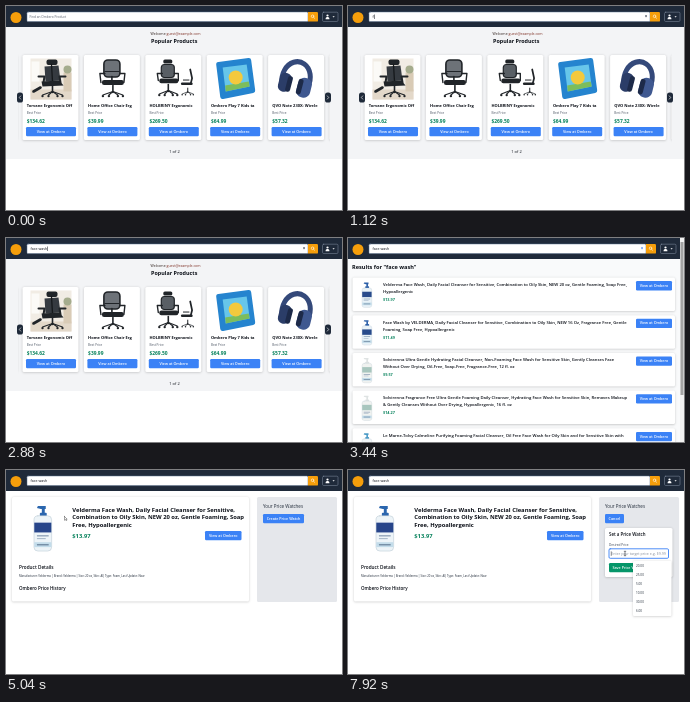
An HTML page with a canvas for the animation above (8 s loop, 336x204 px).

```html
<!DOCTYPE html>
<html lang="en">
<head>
<meta charset="utf-8">
<title>Price watch demo</title>
<style>
html, body { margin: 0; width: 100%; height: 100%; overflow: hidden; background: #fff; }
canvas { display: block; width: 336px; height: 204px; }
</style>
</head>
<body>
<canvas id="stage"></canvas>
<script>
const W = 336, H = 204, LOOP = 8000;
const canvas = document.getElementById('stage');
const ctx = canvas.getContext('2d');
const ratio = window.devicePixelRatio || 1;
canvas.width = W * ratio;
canvas.height = H * ratio;

const FONT = '"Open Sans", "Noto Sans", sans-serif';
const NAVY = '#1f2a3a', BLUE = '#3b82f6', GREEN = '#059669', INK = '#0b0f17', ORANGE = '#f59e0b';
const PRICE = '#04805a';
const SHOP = 'Ombero';
const QUERY = 'face wash';

// Moments of the story, in ms
const T = { type: 1040, key: 180, results: 3040, product: 4640, form: 5760, focus: 6800 };

function rect(x, y, w, h, fill, r = 0, stroke, line = 0.5) {
  ctx.beginPath();
  ctx.roundRect(x, y, w, h, r);
  if (fill) { ctx.fillStyle = fill; ctx.fill(); }
  if (stroke) { ctx.strokeStyle = stroke; ctx.lineWidth = line; ctx.stroke(); }
}

function card(x, y, w, h, r = 1.5) {
  ctx.save();
  ctx.shadowColor = 'rgba(0,0,0,.22)';
  ctx.shadowBlur = 2.5 * ratio;
  ctx.shadowOffsetY = 0.6 * ratio;
  rect(x, y, w, h, '#fff', r);
  ctx.restore();
}

function disc(x, y, r, fill) {
  ctx.beginPath();
  ctx.arc(x, y, r, 0, Math.PI * 2);
  ctx.fillStyle = fill;
  ctx.fill();
}

function path(points, stroke, line, fill) {
  ctx.beginPath();
  points.forEach(([x, y], i) => i ? ctx.lineTo(x, y) : ctx.moveTo(x, y));
  if (fill) { ctx.closePath(); ctx.fillStyle = fill; ctx.fill(); }
  if (stroke) {
    ctx.strokeStyle = stroke; ctx.lineWidth = line;
    ctx.lineCap = ctx.lineJoin = 'round';
    ctx.stroke();
  }
}

function text(str, x, y, size, color = INK, weight = 400, align = 'left') {
  ctx.font = `${weight} ${size}px ${FONT}`;
  ctx.textAlign = align;
  ctx.textBaseline = 'middle';
  ctx.fillStyle = color;
  ctx.fillText(str, x, y);
}

function button(label, x, y, w, h = 9.3, fill = BLUE, size = 3.7) {
  rect(x, y, w, h, fill, 1.2);
  text(label, x + w / 2, y + h / 2, size, '#fff', 600, 'center');
}

function at(x, y, scale, draw) {
  ctx.save();
  ctx.translate(x, y);
  ctx.scale(scale, scale);
  draw();
  ctx.restore();
}

function nav(t, right) {
  rect(0, 0, W, 21, NAVY);
  disc(10, 11.5, 5.5, ORANGE);
  rect(21, 6, right - 55, 9.6, '#fff', 1.2, '#5f7590', 0.5);
  const typed = QUERY.slice(0, Math.max(0, Math.floor((t - T.type) / T.key) + 1));
  if (typed) {
    text(typed, 24.5, 10.8, 3.6, INK);
    if (t < T.product) text('×', right - 38, 10.7, 4.6, t < T.results ? '#374151' : BLUE, 700, 'center');
    if (t < T.results) {
      ctx.font = `400 3.6px ${FONT}`;
      rect(24.8 + ctx.measureText(typed).width, 8.5, 0.5, 4.6, INK);
    }
  } else {
    text(`Find an ${SHOP} Product`, 23.5, 10.8, 3.2, '#565e6b');
  }
  rect(right - 34, 6, 10, 9.6, ORANGE, [0, 1.2, 1.2, 0]);
  ctx.beginPath();
  ctx.arc(right - 29.4, 10.3, 1.3, 0, 7);
  ctx.strokeStyle = '#fff'; ctx.lineWidth = 0.6; ctx.stroke();
  path([[right - 28.4, 11.3], [right - 27.4, 12.3]], '#fff', 0.6);
  rect(right - 19.5, 6.2, 15.5, 9.3, NAVY, 1.2, '#8793a4', 0.5);
  disc(right - 14.5, 9.5, 1.1, '#fff');
  rect(right - 16.4, 11.1, 3.8, 2.2, '#fff', [1.5, 1.5, 0, 0]);
  path([[right - 9.5, 10.3], [right - 7.3, 10.3], [right - 8.4, 11.5]], null, 0, '#fff');
}

// Product pictures, drawn in a 41 by 41 box
const BLACK = '#202428';

function legs(x, y, reach) {
  path([[x, y - 7], [x, y]], BLACK, 1.6);
  for (const dx of [-reach, -reach * 0.4, reach * 0.5, reach]) {
    path([[x, y - 1], [x + dx, y + 2.5]], BLACK, 1.1);
    disc(x + dx, y + 3.6, 1.2, BLACK);
  }
}

function officeRoom() {
  rect(0, 0, 41, 41, '#f1ece4');
  rect(0, 31, 41, 10, '#e3d8c9');
  rect(1, 3, 8, 20, '#fbfaf7');
  rect(33, 14, 8, 19, '#d9cbb6');
  disc(37, 11, 4, '#a5ac8d');
  rect(16, 1, 11, 5.5, BLACK, 2);
  path([[14, 8], [28, 7], [30, 22], [15, 23]], null, 0, '#353a40');
  path([[21, 6], [22, 23]], '#15181b', 1.3);
  path([[8, 18], [14, 18], [13, 24]], BLACK, 2);
  path([[35, 18], [29, 18], [30, 24]], BLACK, 2);
  path([[11, 23], [29, 22], [33, 27], [12, 28]], null, 0, BLACK);
  path([[10, 29], [3, 33]], BLACK, 2.6);
  legs(22, 34, 10);
}

function meshChair() {
  rect(12, 1.5, 16, 17, '#6d7278', 4, BLACK, 1.6);
  path([[13, 13], [27, 13]], BLACK, 1.1);
  path([[20, 18], [20, 23]], BLACK, 1.6);
  path([[9, 24], [8, 15], [13, 15]], BLACK, 1.4);
  path([[32, 24], [33, 15], [28, 15]], BLACK, 1.4);
  rect(10, 21.5, 22, 5, BLACK, 2.2);
  legs(21, 34, 10);
}

function chairPair() {
  rect(10, 1, 9, 4, BLACK, 1.6);
  rect(8, 6, 13, 13, '#595f65', 3, BLACK, 1.2);
  path([[5, 22], [4, 15], [9, 15]], BLACK, 1.4);
  path([[25, 22], [25, 15], [21, 15]], BLACK, 1.4);
  rect(6, 20, 19, 4.8, BLACK, 2);
  legs(15, 33, 9);
  at(27, 11, 0.62, () => {
    path([[16, 0], [19, 14], [17, 22]], BLACK, 2.8);
    path([[3, 23], [18, 23]], BLACK, 4);
    path([[5, 17], [14, 17]], BLACK, 1.6);
    legs(12, 37, 9);
  });
}

function tablet() {
  path([[4, 6], [34, 2], [38, 32], [8, 38]], '#2584cf', 5, '#2584cf');
  path([[8, 9], [32, 6], [35, 28], [11, 33]], null, 0, '#67c6ea');
  path([[10.5, 27], [34, 23], [35, 28], [11, 33]], null, 0, '#7cbd5c');
  disc(21, 19, 7, '#f3c93d');
}

function headphones() {
  ctx.save();
  ctx.translate(20, 20);
  ctx.rotate(0.25);
  ctx.beginPath();
  ctx.ellipse(0, 0, 14, 17, 0, Math.PI * 0.85, Math.PI * 2.1);
  ctx.strokeStyle = '#34497a'; ctx.lineWidth = 5; ctx.stroke();
  rect(-16, -3, 12, 19, '#2b3d68', 5.5);
  rect(-8, -1, 5, 16, '#1d2a49', 2.5);
  rect(3, -3, 14, 20, '#3f5890', 6.5);
  rect(3, -1, 5, 16, '#1d2a49', 2.5);
  ctx.restore();
}

// Pump bottle in a 20 by 48 box
function bottle(cap, body, label) {
  path([[4, 3], [5, 1], [13, 1], [13, 4], [8, 4]], null, 0, cap);
  rect(9, 3, 3, 6, cap);
  rect(7, 8, 7, 4, cap, 1);
  rect(1, 11, 18, 36, body, 4, '#b3c3ce', 0.5);
  rect(1.3, 18, 17.4, 10, label);
  rect(4, 31, 12, 1, '#6a83a0');
  rect(4, 34, 9, 0.8, '#8ba1b7');
  rect(1.3, 38, 17.4, 5, '#c3dcea');
  rect(4, 40, 12, 1.2, '#647d97');
}

const goods = [
  ['Torvane Ergonomic Off', '$134.62', officeRoom],
  ['Home Office Chair Erg', '$39.99', meshChair],
  ['HOLBRINY Ergonomic', '$269.50', chairPair],
  [SHOP + ' Play 7 Kids ta', '$64.99', tablet],
  ['QVO Note 230X: Wirele', '$57.32', headphones]
];

function arrow(x, dir) {
  rect(x - 3, 86.5, 6, 10, NAVY, 2.6);
  path([[x - dir * 0.7, 89.9], [x + dir * 0.7, 91.5], [x - dir * 0.7, 93.1]], '#fff', 0.6);
}

function home(t) {
  rect(0, 0, W, H, '#fff');
  rect(0, 20, W, 133, '#f3f4f6');
  nav(t, W);
  text('Welcome ', 160.5, 28.3, 3.5, '#2c1d1a', 500, 'right');
  text('guest@example.com', 160.5, 28.3, 3.5, '#7d2d22', 500);
  text('Popular Products', 168.2, 36, 5.4, INK, 700, 'center');
  ctx.save();
  ctx.beginPath();
  ctx.rect(12, 44, 312, 96);
  ctx.clip();
  for (let i = -1; i < 6; i++) {
    const x = 16.5 + i * 61.4, item = goods[i];
    card(x, 49, 56, 85);
    if (!item) continue;
    at(x + 8, 52.5, 1, item[2]);
    text(item[0], x + 4.2, 99.8, 4, INK, 700);
    text('Best Price', x + 4.2, 107.2, 3.1, '#4b5563');
    text(item[1], x + 4.2, 115.3, 4.9, PRICE, 700);
    button('View at ' + SHOP, x + 3.5, 121, 50);
  }
  ctx.restore();
  arrow(14, -1);
  arrow(322, 1);
  text('1 of 2', 168.5, 146, 4, INK, 400, 'center');
}

const hits = [
  ['Velderma Face Wash, Daily Facial Cleanser for Sensitive, Combination to Oily Skin, NEW 20 oz, Gentle Foaming, Soap Free,',
    'Hypoallergenic', '$13.97', '#2b5fa8', '#e9f2f7', '#294b8b'],
  ['Face Wash by VELDERMA, Daily Facial Cleanser for Sensitive, Combination to Oily Skin, NEW 16 Oz, Fragrance Free, Gentle',
    'Foaming, Soap Free, Hypoallergenic', '$11.49', '#2b5fa8', '#e9f2f7', '#294b8b'],
  ['Solvirenna Ultra Gentle Hydrating Facial Cleanser, Non-Foaming Face Wash for Sensitive Skin, Gently Cleanses Face',
    'Without Over Drying, Oil-Free, Soap-Free, Fragrance-Free, 12 fl. oz', '$9.57', '#dfe3e3', '#f0f2f0', '#a8c6be'],
  ['Solvirenna Fragrance Free Ultra Gentle Foaming Daily Cleanser, Hydrating Face Wash for Sensitive Skin, Removes Makeup',
    '& Gently Cleanses Without Over Drying, Hypoallergenic, 16 fl. oz', '$14.27', '#dfe3e3', '#f0f2f0', '#a8c6be'],
  ['Le Marne-Tolvy Calmeline Purifying Foaming Facial Cleanser, Oil Free Face Wash for Oily Skin and for Sensitive Skin with',
    '', '', '#4c9bc7', '#f2f6f8', '#b6d4e5']
];

function results(t) {
  rect(0, 0, W, H, '#f9fafb');
  nav(t, 332);
  text(`Results for "${QUERY}"`, 4, 30, 5.6, INK, 700);
  hits.forEach(([top, next, price, cap, body, label], i) => {
    const y = 39.5 + i * 37.7;
    card(4.5, y, 322.5, 33.5);
    at(13.5, y + 4.5, 0.54, () => bottle(cap, body, label));
    text(top, 35, y + 7.5, 4.2, INK, 600);
    text(next, 35, y + 14.4, 4.2, INK, 600);
    text(price, 35, y + 22.5, 3.8, PRICE, 700);
    button('View at ' + SHOP, 288, y + 3.6, 36);
  });
  rect(332, 0, 4, H, '#f1f1f1');
  rect(332.5, 4, 3, 153, '#a3a3a3');
}

function product(t) {
  rect(0, 0, W, H, '#fff');
  nav(t, W);
  card(6, 27, 237, 104.5);
  at(27, 35, 0.98, () => bottle('#2b66ae', '#edf4f8', '#27458a'));
  ['Velderma Face Wash, Daily Facial Cleanser for Sensitive,',
    'Combination to Oily Skin, NEW 20 oz, Gentle Foaming, Soap',
    'Free, Hypoallergenic'].forEach((line, i) => text(line, 66.3, 40.1 + i * 7.5, 5.85, INK, 700));
  text('$13.97', 66.3, 66, 5.8, PRICE, 700);
  button('View at ' + SHOP, 199, 61, 36.5);
  text('Product Details', 13, 98, 4.7, INK, 600);
  text('Manufacturer: Velderma | Brand: Velderma | Size: 20 oz, Skin: All, Type: Foam, Last Update: Now',
    13, 106, 2.8, '#1f2937');
  text(SHOP + ' Price History', 13, 118.6, 4.5, INK, 600);
  panel(t);
}

function panel(t) {
  rect(251, 27, 80, 105, '#e5e7eb', 1.5);
  text('Your Price Watches', 257, 37, 4.5, '#1f2937', 500);
  if (t < T.form) {
    button('Create Price Watch', 257, 44, 41);
    return;
  }
  button('Cancel', 257, 44, 19);
  const focus = t >= T.focus;
  card(257, 58, 67.5, 49);
  text('Set a Price Watch', 261, 65.2, 4.4, INK, 600);
  text('Desired Price', 261, 74.7, 3.2, '#374151');
  rect(261, 78.8, 59.5, 9.5, '#fff', 1.2, focus ? BLUE : '#c3c8d0', focus ? 0.9 : 0.5);
  text('Enter your target price e.g. $9.99', 263.2, 83.7, 3.6, '#858c98');
  if (focus && (t - T.focus) % 1000 < 500) rect(262.9, 81.3, 0.4, 4.7, INK);
  button('Save Price Watch', 261, 93, 37, 9.3, GREEN);
  if (focus) {
    card(285, 91, 38.5, 55, 1);
    ['20.00', '25.00', '5.00', '10.00', '30.00', '6.00']
      .forEach((price, i) => text(price, 288, 96.3 + i * 8.9, 3.1, '#1f2937'));
  }
}

function glide(t, from, to, a, b) {
  const p = Math.min(1, Math.max(0, (t - from) / (to - from)));
  const e = p * p * (3 - 2 * p);
  return a.map((v, i) => v + (b[i] - v) * e);
}

function pointer(t) {
  if (t < 3700) return;
  const link = [58.5, 46.5], make = [278.5, 51], field = [277, 83.5];
  const [x, y] = t < 5100 ? glide(t, 3700, 4350, [60, 12], link)
    : t < 6320 ? glide(t, 5100, 5680, link, make)
    : glide(t, 6360, 6740, make, field);
  if (t > 6660) {
    path([[x - 0.8, y - 2.2], [x + 0.8, y - 2.2]], INK, 0.4);
    path([[x, y - 2.2], [x, y + 2.2]], INK, 0.5);
    path([[x - 0.8, y + 2.2], [x + 0.8, y + 2.2]], INK, 0.4);
  } else {
    path([[x, y], [x, y + 3.8], [x + 0.9, y + 3], [x + 1.5, y + 4.2], [x + 2.1, y + 3.9],
      [x + 1.5, y + 2.8], [x + 2.7, y + 2.7], [x, y]], '#222', 0.4, '#fff');
  }
}

function draw(t) {
  ctx.setTransform(ratio, 0, 0, ratio, 0, 0);
  if (t < T.results) home(t);
  else if (t < T.product) results(t);
  else product(t);
  pointer(t);
}

const start = performance.now();
function tick() {
  draw((performance.now() - start) % LOOP);
  requestAnimationFrame(tick);
}
tick();
</script>
</body>
</html>
```
